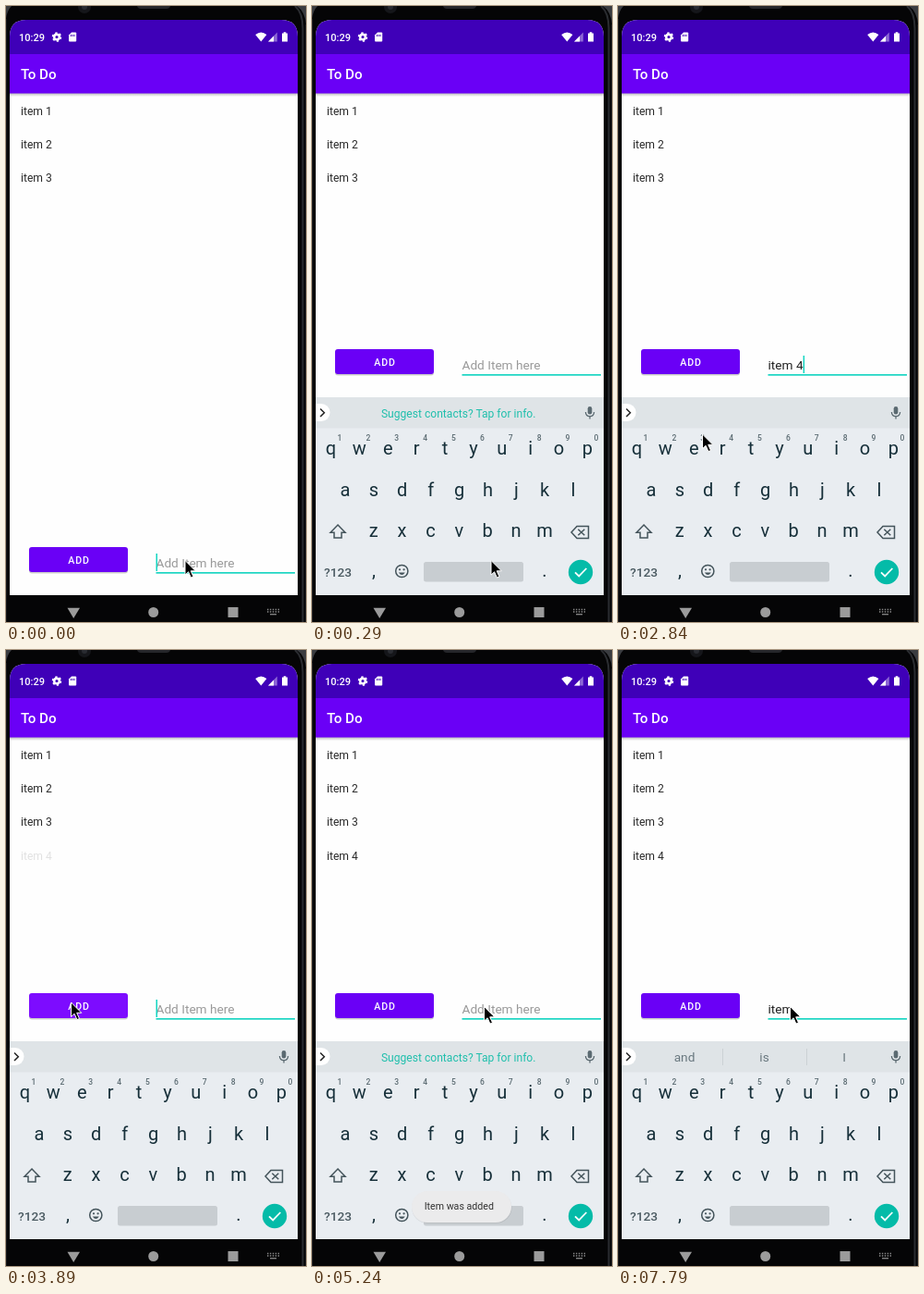
Write an HTML page that moves like this. It is 325 px wide and 666 px high and loops after 8000 ms.

```html
<!DOCTYPE html>
<html lang="en">
<head>
<meta charset="utf-8">
<title>To Do</title>
<style>
  html, body { margin: 0; width: 100%; height: 100%; overflow: hidden; background: #050506; }
  svg { display: block; width: 325px; height: 666px; }
  text { font-family: Roboto, sans-serif; white-space: pre; }
  .mid { text-anchor: middle; }
  .bold { font-weight: 500; }
  .item { font-size: 12.15px; fill: #2b2b2b; }
  .field { font-size: 13.67px; }
  .key { font-size: 20px; fill: #17303a; }
  .num { font-size: 8.5px; fill: #5b6b72; font-weight: 500; }
  .word { font-size: 13.67px; fill: #69787f; }
  .line { fill: none; stroke: #44545b; stroke-width: 1.5; }
</style>
</head>
<body>
<svg viewBox="0 0 325 666">
  <defs>
    <clipPath id="glass"><path d="M4 637V33Q4 15 22 15H298Q316 15 316 33V637Z"/></clipPath>
    <linearGradient id="shade" x2="0" y2="1">
      <stop offset="0" stop-color="#000" stop-opacity=".28"/>
      <stop offset="1" stop-color="#000" stop-opacity="0"/>
    </linearGradient>
  </defs>

  <!-- phone body -->
  <rect width="325" height="666" fill="#050506"/>
  <path d="M0 14Q1 5 6 0H0ZM325 20Q324 6 315 0H325Z" fill="#3a3c40"/>
  <path d="M313 0Q321.5 7 321.5 24V666" fill="none" stroke="#2b2d31" stroke-width="2"/>
  <path d="M324.5 20V666M.5 14V666" stroke="#17181b"/>
  <circle cx="85" cy="1" r="7" fill="#15161a"/>
  <circle cx="85" cy="1" r="3" fill="#292b31"/>
  <path d="M142 0H178Q177 3 174 3H146Q143 3 142 0Z" fill="#25262a"/>

  <g clip-path="url(#glass)">
    <rect x="4" y="15" width="312" height="622" fill="#fefefe"/>
    <rect x="4" y="94" width="312" height="4" fill="url(#shade)"/>
    <rect x="4" y="15" width="312" height="37" fill="#3f00b8"/>
    <rect x="4" y="52" width="312" height="42.5" fill="#6a00f6"/>
    <text x="16" y="79" class="bold" font-size="15.2" fill="#fff">To Do</text>

    <!-- status bar -->
    <text x="14" y="37.6" class="bold" font-size="11" fill="#fff">10:29</text>
    <g fill="#fff">
      <circle cx="55" cy="33.5" r="2.8" fill="none" stroke="#fff" stroke-width="2.4"/>
      <circle cx="55" cy="33.5" r="4.4" fill="none" stroke="#fff" stroke-width="1.7" stroke-dasharray="2.3 2.3"/>
      <path d="M71 28.5H75.2Q76.2 28.5 76.2 29.5V37.5Q76.2 38.5 75.2 38.5H69Q68 38.5 68 37.5V31.5Z"/>
      <path d="M70.5 30.8V33M72.3 30.8V33M74.1 30.8V33" stroke="#3f00b8" stroke-width=".9"/>
      <path d="M270.2 31Q276.3 26 282.4 31L276.3 38.6Z"/>
      <path d="M293.8 28.5V38.5H284Z" opacity=".4"/>
      <path d="M290 32.4V38.5H284Z"/>
      <path d="M299 29.5H300.7V28.3H303.3V29.5H305V38.6H299Z"/>
    </g>

    <g id="list"></g>

    <g id="entry">
      <rect x="25" y="372" width="107" height="27.5" rx="3" fill="#000" opacity=".2"/>
      <rect id="button" x="25" y="371" width="107" height="27" rx="3"/>
      <text x="79" y="388.7" class="mid bold" font-size="10.6" letter-spacing=".95" fill="#fff">ADD</text>
      <text id="hint" x="162.5" y="393" class="field" fill="#9a9a9a">Add Item here</text>
      <text id="typed" x="162.5" y="393" class="field" fill="#222"></text>
      <rect id="under" x="163" y="394" height="1" fill="#333"/>
      <rect id="caret" y="378" width="1.5" height="19" fill="#12d5c1"/>
      <rect x="162.5" y="398" width="150.5" height="1.7" fill="#1cd6c3"/>
    </g>

    <g id="keyboard">
      <rect x="4" y="423" width="312" height="34" fill="#dfe4e7"/>
      <rect x="4" y="456.5" width="312" height="181" fill="#e9edf1"/>
      <path d="M4 430H10A9.5 9.5 0 0 1 10 449H4Z" fill="#fff"/>
      <path d="M9 435.5L13.3 439.8L9 444" class="line" style="stroke:#222"/>
      <rect x="298.7" y="433" width="4.6" height="8.5" rx="2.3" fill="#5b6a71"/>
      <path d="M296.4 439Q296.6 443.6 301 443.6T305.6 439M301 443.6V446.5" class="line" style="stroke:#5b6a71;stroke-width:1.3"/>

      <text id="promo" x="158.7" y="444.5" class="mid" font-size="12.1" fill="#1fbfac">Suggest contacts? Tap for info.</text>
      <g id="words">
        <path d="M113.5 431V449M204.5 431V449" stroke="#cbd1d5"/>
        <text x="72" y="445" class="mid word"></text>
        <text x="158.5" y="445" class="mid word"></text>
        <text x="245" y="445" class="mid word"></text>
      </g>

      <g id="keys"></g>
      <path d="M28 561L36 569.2H32V575H24V569.2H20Z" class="line"/>
      <path d="M287 562.5H299.5V575.5H287L281 569ZM288.3 565.7L295.3 572.3M295.3 565.7L288.3 572.3" class="line"/>
      <text x="28" y="616.5" class="mid bold" font-size="13.7" fill="#4a5a61">?123</text>
      <text x="67" y="617" class="mid key">,</text>
      <circle cx="97.3" cy="611" r="6.6" class="line"/>
      <circle cx="95" cy="609.3" r="1.1" fill="#44545b"/>
      <circle cx="99.6" cy="609.3" r="1.1" fill="#44545b"/>
      <path d="M93.8 612.4Q97.3 617.4 100.8 612.4Z" fill="#44545b"/>
      <rect x="121" y="601" width="108" height="21.5" rx="2.5" fill="#c8cdd1"/>
      <text x="252" y="617" class="mid key">.</text>
      <circle cx="291" cy="612" r="13.2" fill="#04bba8"/>
      <path d="M285 612.3L289.2 616.4L297.3 608" fill="none" stroke="#fff" stroke-width="1.8"/>
    </g>

    <g id="toast">
      <rect x="108" y="586" width="108.5" height="34" rx="17" fill="#000" opacity=".07"/>
      <rect x="108" y="585" width="108" height="34" rx="17" fill="#ebebec"/>
      <text x="121.7" y="604.8" font-size="10.64" fill="#303030">Item was added</text>
    </g>
  </g>

  <!-- navigation bar -->
  <g fill="#9b9b9b">
    <path d="M66.5 650.8H80L73.2 662Z"/>
    <circle cx="159.7" cy="655.5" r="5.5"/>
    <rect x="240.5" y="650" width="11" height="11"/>
    <path d="M283 652.5H296M283 655H296" stroke="#8a8a8a" stroke-width="1.4" stroke-dasharray="1.4 1.5"/>
    <path d="M286 657.7H293" stroke="#8a8a8a" stroke-width="1.3"/>
  </g>

  <path id="mouse" d="M0 0V15.6L3.6 12.3L6.4 18.6L9 17.5L6.2 11.3H11.3Z" fill="#000" stroke="#fff" stroke-width="1"/>
</svg>

<script>
const LOOP = 8000, LEFT = 162.5;
const $ = id => document.getElementById(id);

function addText(parent, x, y, cls, str) {
  const el = document.createElementNS('http://www.w3.org/2000/svg', 'text');
  el.setAttribute('x', x);
  el.setAttribute('y', y);
  el.setAttribute('class', cls);
  el.textContent = str;
  return parent.appendChild(el);
}

const items = [1, 2, 3, 4].map(n => addText($('list'), 16, 81.1 + n * 36.4, 'item', 'item ' + n));

[['qwertyuiop', 20.5, 485], ['asdfghjkl', 36, 529.5], ['zxcvbnm', 66.7, 574]].forEach(([row, x, y], r) =>
  [...row].forEach((ch, i) => {
    const cx = x + i * 30.88;
    addText($('keys'), cx, y, 'mid key', ch);
    if (!r) addText($('keys'), cx + 9.5, 470, 'mid num', (i + 1) % 10);
  }));

// Each track is a list of [start time, value]; values hold until the next step.
const tracks = {
  lift: [[0, 0], [150, 1]],
  board: [[0, 220], [150, 60], [290, 0]],
  typed: [[0, ''], [890, 'i'], [1190, 'it'], [1340, 'ite'], [1490, 'item'], [1940, 'item '], [2390, 'item 4'],
    [3440, ''], [5690, 'i'], [6290, 'it'], [6440, 'ite'], [6590, 'item'], [7040, 'item ']],
  caret: [[0, 1], [290, 0], [890, 1], [2990, 0], [3440, 1], [4340, 0], [4790, 1], [5240, 0], [5690, 1], [7790, 0]],
  strip: [[0, 'promo'], [1340, 'ite item items'], [1490, 'item items itemized'], [1940, 'and is I'], [2540, ''],
    [4190, 'promo'], [6440, 'ite item items'], [6590, 'item items itemized'], [7190, 'and is I']],
  pressed: [[0, 0], [3440, 1], [4190, 0]],
  fresh: [[0, 0], [3890, .13], [4040, .5], [4190, .88], [4340, 1]],
  toast: [[0, 0], [4190, .4], [4340, 1], [6290, .2], [6440, 0]],
  mouse: [[0, [194, 599.5]], [2840, [91.5, 463]], [2990, [61.5, 370]], [3140, [70.5, 381]],
    [4340, [105.5, 384]], [4490, [169.5, 382.5]], [4640, [180, 384]], [4790, [186.5, 385.5]]]
};

const at = (name, t) => tracks[name].findLast(step => step[0] <= t)[1];
const show = (el, on) => el.setAttribute('opacity', +on);
const move = (el, x, y) => el.setAttribute('transform', `translate(${x} ${y})`);

function draw(t) {
  const typed = at('typed', t), strip = at('strip', t);
  move($('entry'), 0, at('lift', t) ? 0 : 214);
  move($('keyboard'), 0, at('board', t));
  move($('mouse'), ...at('mouse', t));

  $('typed').textContent = typed;
  const width = typed ? $('typed').getComputedTextLength() : 0;
  show($('hint'), !typed);
  show($('caret'), at('caret', t));
  $('caret').setAttribute('x', LEFT + width);
  $('under').setAttribute('width', typed.includes(' ') ? 0 : width);
  $('button').setAttribute('fill', at('pressed', t) ? '#7d0cff' : '#6a00f6');

  const words = strip === 'promo' ? [] : strip.split(' ');
  show($('promo'), strip === 'promo');
  show($('words'), words.length > 1);
  $('words').querySelectorAll('text').forEach((el, i) => el.textContent = words[i] || '');

  show(items[3], at('fresh', t));
  show($('toast'), at('toast', t));
}

const start = performance.now();
function tick(now) {
  draw(Math.max(0, now - start) % LOOP);
  requestAnimationFrame(tick);
}
draw(0);
requestAnimationFrame(tick);
</script>
</body>
</html>
```
